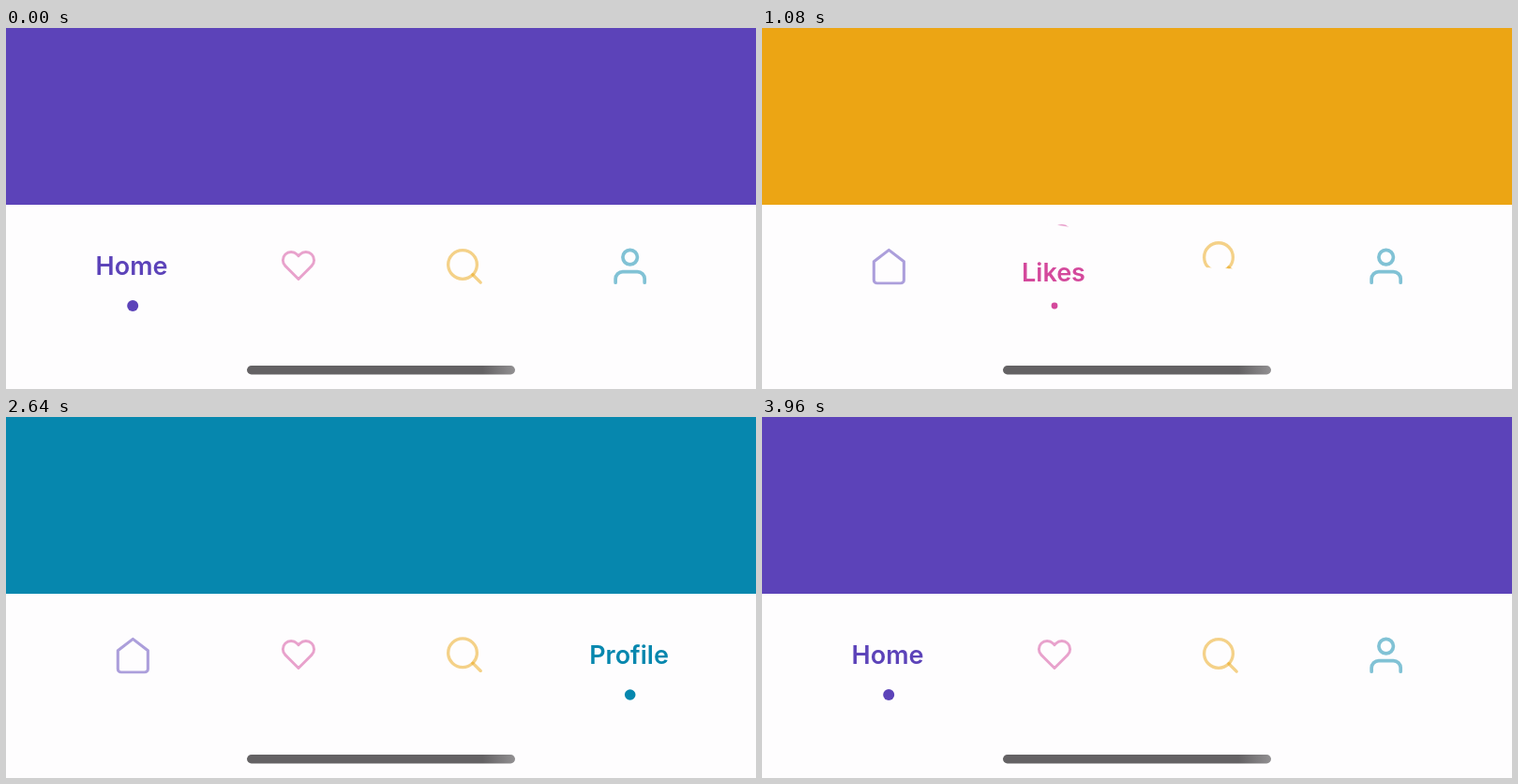
An HTML page for the animation above (4 s loop, 800x386 px).

```html
<!DOCTYPE html>
<html lang="en">
<head>
<meta charset="utf-8">
<title>Tab bar</title>
<style>
  html, body { margin: 0; width: 100%; height: 100%; overflow: hidden; background: #fefdfe; }
  svg { display: block; width: 800px; height: 386px; }
  text { font: 600 27px Inter, "Liberation Sans", sans-serif; text-anchor: middle; }
  .icon { fill: none; stroke-opacity: .5; stroke-linecap: round; stroke-linejoin: round; }
</style>
</head>
<body>
<svg id="stage" viewBox="0 0 800 386">
  <defs>
    <linearGradient id="shine">
      <stop offset="0" stop-color="#646264"/>
      <stop offset=".88" stop-color="#646264"/>
      <stop offset="1" stop-color="#929092"/>
    </linearGradient>
  </defs>
  <rect width="800" height="386" fill="#fefdfe"/>
  <rect id="screen" width="800" height="189"/>
  <rect x="257" y="361" width="286" height="9.5" rx="4.75" fill="url(#shine)"/>
</svg>
<script>
const LOOP = 4000, TAU = 148, TRAVEL = 36;

// start: when the tab is chosen; ix, iy, scale: place of its 24-unit icon
const tabs = [
  { name: 'Home', color: '#5c43b9', start: 3063, x: 134, dot: 135.2,
    ix: 114, iy: 233.8, scale: 1.78, width: 3.1,
    paths: ['M3 9l9-7 9 7v11a2 2 0 0 1-2 2H5a2 2 0 0 1-2-2z'] },
  { name: 'Likes', color: '#d4499c', start: 8, x: 311, dot: 312,
    ix: 292.9, iy: 234.7, scale: 1.59, width: 2.9,
    paths: ['M20.84 4.61a5.5 5.5 0 0 0-7.78 0L12 5.67l-1.06-1.06a5.5 5.5 0 0 0-7.78 7.78L12 21.23l8.84-8.84a5.5 5.5 0 0 0 0-7.78z'] },
  { name: 'Search', color: '#eca514', start: 1045, x: 487, dot: 488.8,
    ix: 465.9, iy: 231.8, scale: 1.92, width: 3.3,
    paths: ['M19 11a8 8 0 1 1-16 0a8 8 0 1 1 16 0z', 'M21 21l-4.35-4.35'] },
  { name: 'Profile', color: '#0687ae', start: 2063, x: 664.5, dot: 665.7,
    ix: 642.4, iy: 231.5, scale: 1.94, width: 3.7,
    paths: ['M20 21v-2a4 4 0 0 0-4-4H8a4 4 0 0 0-4 4v2', 'M16 7a4 4 0 1 1-8 0a4 4 0 1 1 8 0z'] }
];

const stage = document.getElementById('stage');
const screen = document.getElementById('screen');

function add(parent, tag, attrs = {}) {
  const el = document.createElementNS('http://www.w3.org/2000/svg', tag);
  for (const key in attrs) el.setAttribute(key, attrs[key]);
  return parent.appendChild(el);
}

function addClip(id) {
  return add(add(stage, 'clipPath', { id }), 'path');
}

for (const tab of tabs) {
  const iconId = 'icon' + tab.name, labelId = 'label' + tab.name;
  tab.iconEdge = addClip(iconId);
  tab.labelEdge = addClip(labelId);

  const iconBox = add(stage, 'g', { 'clip-path': `url(#${iconId})` });
  tab.icon = add(iconBox, 'g', {
    class: 'icon', stroke: tab.color, 'stroke-width': tab.width / tab.scale
  });
  for (const d of tab.paths) add(tab.icon, 'path', { d });

  const labelBox = add(stage, 'g', { 'clip-path': `url(#${labelId})` });
  tab.label = add(labelBox, 'text', { x: tab.x, fill: tab.color });
  tab.label.textContent = tab.name;

  tab.mark = add(stage, 'circle', { cx: tab.dot, cy: 297, fill: tab.color });
}

const easeOut = ms => Math.min(1, (1 - Math.exp(-ms / TAU)) / (1 - Math.exp(-6)));

function pose(tab, p) {
  const lift = -TRAVEL * p;
  const cut = 274.5 - 82 * p, tilt = 10 * p;
  const left = tab.dot - 50, right = tab.dot + 50;
  tab.icon.setAttribute('transform', `translate(${tab.ix} ${tab.iy + lift}) scale(${tab.scale})`);
  tab.iconEdge.setAttribute('d', `M${left} 190H${right}V${Math.max(190, cut + tilt)}L${left} ${Math.max(190, cut - tilt)}z`);
  tab.label.setAttribute('y', 263.7 + TRAVEL + lift);
  tab.labelEdge.setAttribute('d', `M${left} ${309 - 76 * p}H${right}V320H${left}z`);
  tab.mark.setAttribute('r', Math.max(0, 6 * (2 * p - 1)));
}

function draw(time) {
  const t = time % LOOP;
  let active = 0;
  tabs.forEach((tab, i) => {
    if (t >= tab.start && (i || t >= tabs[3].start)) active = i;
  });
  if (t >= tabs[0].start) active = 0;
  const last = (active + 3) % 4;
  const since = (t - tabs[active].start + LOOP) % LOOP;
  const p = easeOut(since);
  tabs.forEach((tab, i) => pose(tab, i === active ? p : i === last ? 1 - p : 0));
  screen.setAttribute('fill', tabs[active].color);
}

const begin = performance.now();
function tick() {
  draw(performance.now() - begin);
  requestAnimationFrame(tick);
}
draw(0);
requestAnimationFrame(tick);
</script>
</body>
</html>
```
